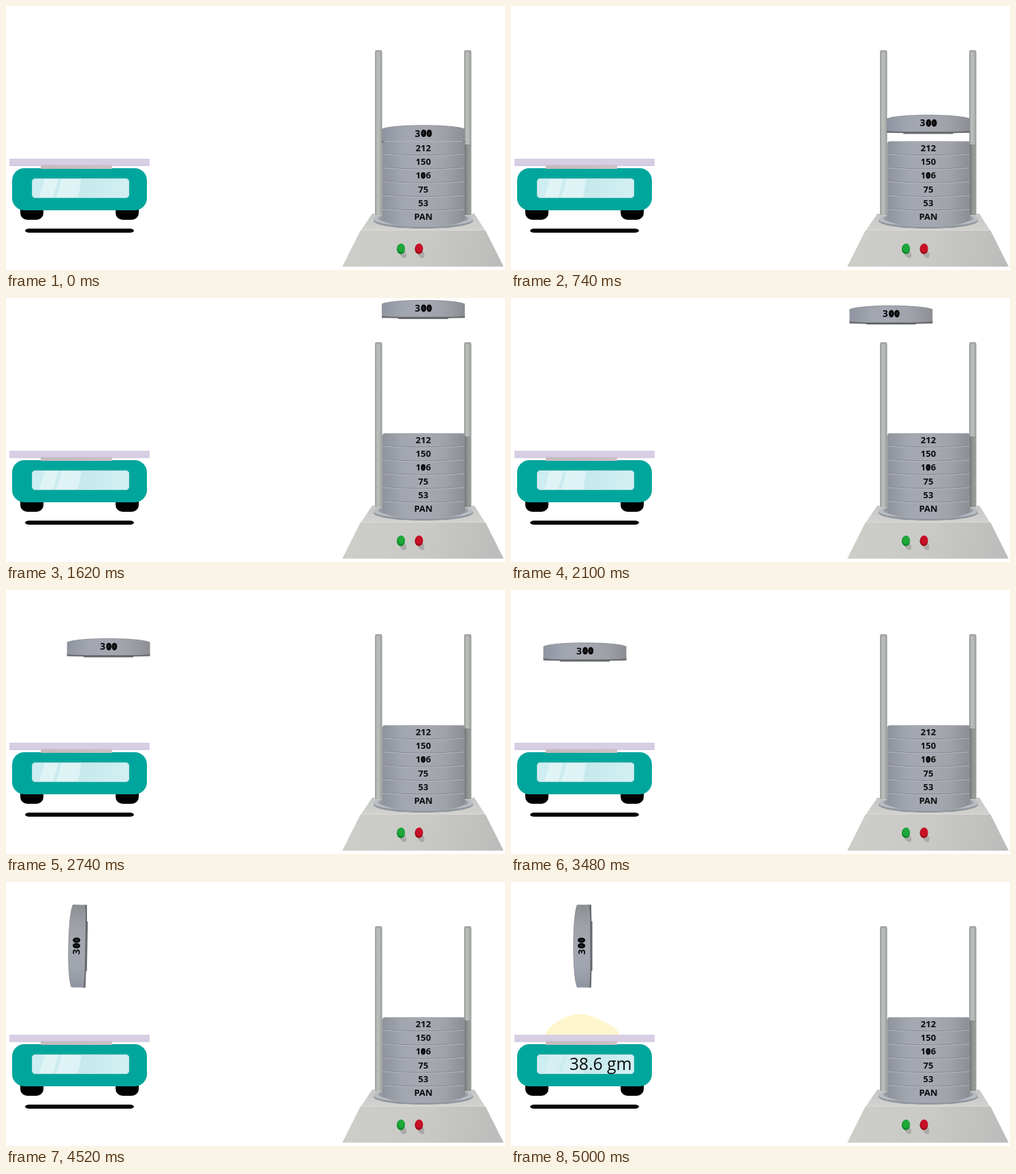
These frames come from a looping animation (733 px wide and 389 px high, 5420 ms). An HTML page with a canvas:

```html
<!DOCTYPE html>
<html lang="en">
<head>
<meta charset="utf-8">
<title>Sieve weighing</title>
<style>
  html, body { margin: 0; width: 100%; height: 100%; overflow: hidden; background: #fff; }
  canvas { display: block; }
</style>
</head>
<body>
<canvas id="stage" width="733" height="389"></canvas>
<script>
const ctx = document.getElementById('stage').getContext('2d');
const LOOP = 5420;
const MOVE = 1067;
const FONT = '"Open Sans", "Noto Sans", sans-serif';

// Sine ease-in-out from 0 to 1
const ease = (t, start, span = MOVE) => {
  const u = Math.min(1, Math.max(0, (t - start) / span));
  return (1 - Math.cos(Math.PI * u)) / 2;
};

function gradient(x0, y0, x1, y1, ...colors) {
  const g = ctx.createLinearGradient(x0, y0, x1, y1);
  colors.forEach((c, i) => g.addColorStop(i / (colors.length - 1), c));
  return g;
}

function fill(style, draw) {
  ctx.beginPath();
  draw();
  ctx.fillStyle = style;
  ctx.fill();
}

function stroke(style, width, draw) {
  ctx.beginPath();
  draw();
  ctx.strokeStyle = style;
  ctx.lineWidth = width;
  ctx.stroke();
}

const rect = (style, x, y, w, h, r = 0) => fill(style, () => ctx.roundRect(x, y, w, h, r));
const oval = (style, x, y, rx, ry, turn = 0) =>
  fill(style, () => ctx.ellipse(x, y, rx, ry, turn, 0, 7));
const poly = (style, pts) => fill(style, () => {
  pts.forEach(([x, y]) => ctx.lineTo(x, y));
  ctx.closePath();
});

function label(text, x, y, font, align = 'center') {
  ctx.font = font + ' ' + FONT;
  ctx.textAlign = align;
  ctx.textBaseline = 'alphabetic';
  ctx.fillStyle = '#0c0c0e';
  ctx.fillText(text, x, y);
}

// Zero with an almost closed counter
function boldZero(x, y, rx, ry) {
  oval('#08080a', x, y, rx, ry);
  rect('#66676c', x - 0.4, y - ry * 0.35, 0.8, ry * 0.7);
}

function drawScale(t) {
  const shown = ease(t, 4540, 420);

  rect('#000', 28, 328, 160, 6, { x: 6, y: 3 });
  for (const x of [21, 161]) rect('#000', x, 288, 34, 27, 10);
  rect('#00a69c', 9, 239, 198, 62, 18);

  rect(gradient(38, 254, 181, 283, '#cfeef1', '#c6e9ec', '#d3f0f2'), 38, 254, 143, 29, 5);
  ctx.save();
  ctx.globalAlpha = 0.4 - 0.2 * shown;
  poly('#fff', [[57, 254], [77, 254], [69, 283], [49, 283]]);
  poly('#fff', [[82, 254], [111, 254], [106, 283], [74, 283]]);
  ctx.restore();
  stroke('#b5dde0', 1, () => ctx.roundRect(38.5, 254.5, 142, 28, 5));

  ctx.save();
  ctx.globalAlpha = shown;
  fill('#fff5cd', () => {
    ctx.moveTo(50, 226);
    ctx.bezierCurveTo(53, 214, 68, 206, 78, 200);
    ctx.bezierCurveTo(92, 193, 111, 193, 124, 200);
    ctx.bezierCurveTo(136, 206, 154, 211, 160, 226);
  });
  label('38.6 gm', 177.5, 277, '24.7px', 'right');
  ctx.restore();

  rect('#d7cee4', 5, 225, 206, 11);
  rect(gradient(51, 0, 156, 0, '#c4babd', '#cbc0c6'), 51, 234.5, 105, 5.5);
}

function drawBase() {
  poly(gradient(0, 306, 0, 331, '#c4c6c4', '#d2d3cf'),
    [[538, 306], [688, 306], [704, 331], [521, 331]]);
  poly(gradient(494, 330, 731, 384, '#cdcec8', '#c9cac6', '#bbbcba'),
    [[521, 330], [704, 330], [731, 384], [494, 384]]);
  stroke('#d9dad6', 1, () => { ctx.moveTo(521, 330.5); ctx.lineTo(704, 330.5); });

  oval('#92969e', 613, 316.5, 73, 11.5);
  oval('#b9bdc3', 613, 314, 73, 11);
  oval('#989ca4', 613, 313, 66, 10);
}

function drawButton(x, color, dark) {
  oval('rgba(90,90,88,.28)', x + 3, 365, 4.5, 7, -0.5);
  oval(dark, x, 358, 6, 7.5);
  oval(color, x + 0.5, 356.5, 5.4, 6.4);
}

function drawPoles() {
  for (const x of [542, 673]) {
    rect(gradient(x, 0, x + 11, 0, '#959894', '#bcc0bc', '#b2b5b1', '#8b8e8a'),
      x, 65, 10.5, 243, [3, 3, 2, 2]);
    oval('#a4a7a3', x + 5.2, 66.5, 4.8, 1.5);
  }
  // Shade cast by the stack
  rect(gradient(673, 0, 683, 0, 'rgba(60,62,66,.55)', 'rgba(60,62,66,.1)'), 673, 204, 9, 104);
}

function drawStack() {
  fill(gradient(552, 0, 674, 0, '#8e929a', '#a2a6af', '#a6a9b1', '#a0a3aa', '#8c8e94'), () => {
    ctx.moveTo(552.5, 203);
    ctx.quadraticCurveTo(553, 199, 558, 199);
    ctx.lineTo(669, 199);
    ctx.quadraticCurveTo(674, 199, 674, 203);
    ctx.lineTo(674, 315);
    ctx.quadraticCurveTo(665, 325, 613, 325);
    ctx.quadraticCurveTo(561, 325, 552.5, 315);
  });
  stroke('#b4b7be', 1, () => { ctx.moveTo(557, 199.5); ctx.lineTo(670, 199.5); });

  const names = ['212', '150', '106', '75', '53', 'PAN'];
  names.forEach((name, i) => {
    const y = 20.3 * i;
    if (i) {
      const seam = 197 + y;
      const curve = dy => () => {
        ctx.moveTo(553, seam + dy);
        ctx.quadraticCurveTo(613, seam + 5 + dy, 673.5, seam + dy);
      };
      stroke('#83868e', 1, curve(0));
      stroke('#b6b9c0', 1, curve(1));
    }
    label(name, 613, 213.6 + y, 'bold 13px');
  });
  boldZero(612.7, 249.8, 3.1, 4.7);
}

function drawRing(t) {
  const up = ease(t, 536);
  const side = ease(t, 1872);
  const turn = ease(t, 3527);

  ctx.save();
  ctx.translate(613 - 504.5 * side, 192.5 - 172.5 * up + 74.5 * side);
  ctx.rotate(-Math.PI / 2 * turn);
  ctx.translate(0, -3);

  const arc = () => {
    ctx.moveTo(-61, -8);
    ctx.bezierCurveTo(-48, -15.5, 48, -15.5, 61, -8);
  };
  poly('#67696c', [[-61, 8], [61, 8], [61, 12.3], [37, 12.8], [36, 14], [-36, 14], [-37, 12.8], [-61, 12.3]]);
  fill(gradient(-61, 0, 61, 0, '#9094a0', '#a1a5b0', '#a5a8b1', '#9ea1a8', '#8c8e93'), () => {
    arc();
    ctx.lineTo(61, 9.5);
    ctx.quadraticCurveTo(50, 10.8, 36, 10.8);
    ctx.lineTo(-36, 10.8);
    ctx.quadraticCurveTo(-50, 10.8, -61, 9.5);
    ctx.closePath();
  });
  stroke('#80838b', 0.8, arc);

  label('3', -8.5, 3, 'bold 14px');
  boldZero(0.5, -2, 3.9, 5.6);
  boldZero(8.7, -2, 3.9, 5.6);
  ctx.restore();
}

function draw(t) {
  ctx.fillStyle = '#fff';
  ctx.fillRect(0, 0, 733, 389);
  drawScale(t);
  drawBase();
  drawPoles();
  drawRing(t);
  drawStack();
  drawButton(580, '#1da63a', '#0a8424');
  drawButton(606.5, '#c81026', '#a00a1a');
}

const begin = performance.now();
function tick() {
  const t = (performance.now() - begin) % LOOP;
  draw(Math.floor(t / 20) * 20);
  requestAnimationFrame(tick);
}
tick();
</script>
</body>
</html>
```
